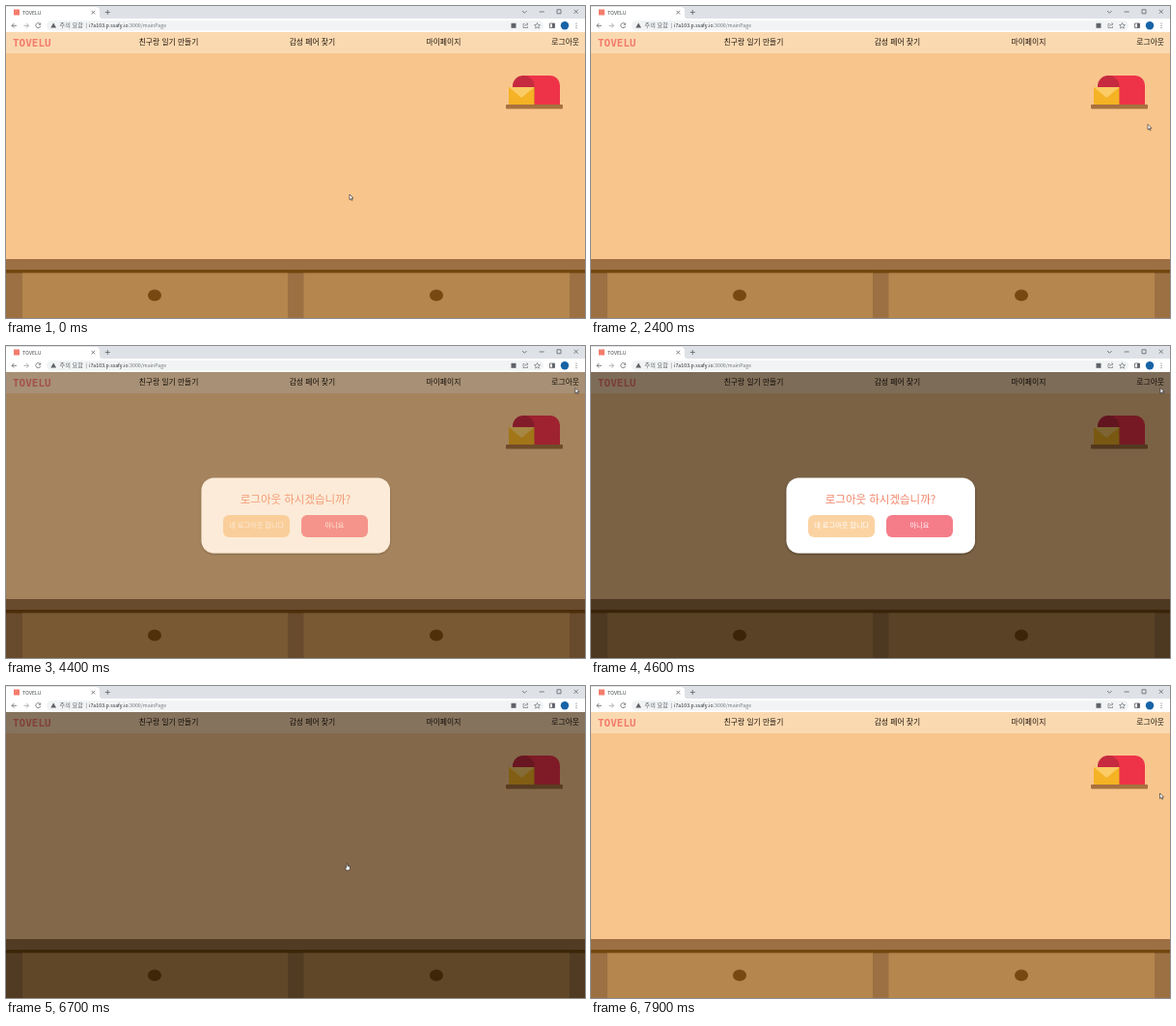
An HTML page for the animation above (8000 ms loop, 600 px wide and 323 px high).

```html
<!DOCTYPE html>
<html lang="ko">
<head>
<meta charset="utf-8">
<style>
html, body { margin: 0; height: 100%; overflow: hidden; }
svg { display: block; width: 100vw; height: 100vh; }
text { font-family: "Noto Sans CJK KR", "Noto Sans CJK", "Noto Sans", sans-serif; white-space: pre; }
.nav { font-size: 7.8px; font-weight: 500; fill: #21160d; }
.icon { fill: none; stroke: #5f6368; stroke-width: .8; }
.mid { text-anchor: middle; font-weight: 500; }
</style>
</head>
<body>
<svg viewBox="0 0 600 323" preserveAspectRatio="none">
  <defs>
    <filter id="shadow" x="-10%" y="-10%" width="120%" height="130%">
      <feDropShadow dx="0" dy="1" stdDeviation="1.2" flood-opacity=".45"/>
    </filter>
  </defs>

  <!-- page -->
  <rect width="600" height="323" fill="#f8c58c"/>
  <rect y="27" width="600" height="22" fill="#fbd9b0"/>
  <text x="7" y="42" style="font:bold 11px 'DejaVu Sans Mono',monospace" fill="#f47c6c">TOVELU</text>
  <g class="nav">
    <text x="137.7" y="40.4">친구랑 일기 만들기</text>
    <text x="293.7" y="40.4">감성 페어 찾기</text>
    <text x="435.5" y="40.4">마이페이지</text>
    <text x="565.3" y="40.4">로그아웃</text>
  </g>

  <!-- mailbox -->
  <path d="M525 102V83a11 11 0 0 1 11-11h12v30z" fill="#c52a3f"/>
  <path d="M536 72h28a10 10 0 0 1 10 10v20h-26.500V83a11 11 0 0 0-11.500-11z" fill="#ee3348"/>
  <rect x="521" y="84" width="26.500" height="18.500" fill="#f4b224"/>
  <path d="M521 84h26.500l-13.200 11z" fill="#fbcb66"/>
  <rect x="518" y="102" width="59" height="4.500" rx="1" fill="#a8713f"/>

  <!-- desk -->
  <rect y="262" width="600" height="61" fill="#9c7043"/>
  <rect y="273" width="600" height="3.500" fill="#744610"/>
  <path d="M17 276.500h275V323H17zM308.500 276.500H584V323H308.500z" fill="#b5864d"/>
  <g fill="#774811">
    <ellipse cx="154" cy="299.500" rx="7" ry="6"/>
    <ellipse cx="446" cy="299.500" rx="7" ry="6"/>
  </g>

  <!-- dialog -->
  <g id="dialog">
    <rect y="27" width="600" height="296" opacity=".5"/>
    <g id="card">
      <rect x="202.500" y="136.500" width="195.500" height="78" rx="13" fill="#fff" filter="url(#shadow)"/>
      <text class="mid" x="300" y="163.300" font-size="11.500" fill="#f0866a">로그아웃 하시겠습니까?</text>
      <rect x="225" y="175" width="69" height="23" rx="6" fill="#fbd3a2"/>
      <rect x="306" y="175" width="69" height="23" rx="6" fill="#f57d8a"/>
      <g fill="#fff" font-size="7.200">
        <text class="mid" x="259.700" y="188.400">네 로그아웃 합니다</text>
        <text class="mid" x="340.400" y="188.400">아니요</text>
      </g>
    </g>
  </g>

  <!-- browser -->
  <rect width="600" height="14" fill="#dee1e6"/>
  <path d="M0 13V1h93q4 0 4 4v5q0 3 3 3z" fill="#fff"/>
  <rect y="13" width="600" height="14" fill="#fff"/>
  <rect x="42" y="15" width="515" height="10.500" rx="5.200" fill="#f1f3f4"/>
  <rect x="8" y="3.500" width="6" height="6" fill="#f47c6c"/>
  <text x="17" y="8.600" font-size="5.300" fill="#45494d">TOVELU</text>
  <g class="icon">
    <path d="M88.500 4.800l3.600 3.600m0-3.600l-3.600 3.600M102.800 6.500h5m-2.500-2.500v5"/>
    <path d="M535 5l2.300 2.300L539.600 5M552.700 6h5M571 3.800h4v4h-4zM588.700 3.800l4 4m0-4l-4 4"/>
    <path d="M11 20.300H6m2.300-2.300L6 20.300l2.300 2.300"/>
    <path d="M18.500 20.300h5m-2.300-2.300l2.300 2.300-2.300 2.300" stroke="#9a9da1"/>
    <path d="M35.300 18.600a2.500 2.500 0 1 0 .4 2.300M35.700 17.500v1.800h-1.800"/>
    <path d="M537.500 18.500H536v4h4.500V21M537.500 21q.5-2.300 3.300-2.300m-1.300-1.400l1.500 1.400-1.500 1.400" stroke-width=".6"/>
    <path d="M550.500 17.400l.9 2 2.100.2-1.600 1.400.5 2.100-1.900-1.100-1.900 1.100.5-2.100-1.600-1.400 2.100-.2z" stroke-width=".6"/>
    <path d="M563.500 18h5v4.600h-5z"/>
  </g>
  <g fill="#5f6368">
    <path d="M49.200 17.600l2.900 5h-5.800zM566 18h2.500v4.600H566z"/>
    <rect x="523.500" y="17.800" width="5" height="5"/>
    <circle cx="591" cy="18" r=".6"/><circle cx="591" cy="20.300" r=".6"/><circle cx="591" cy="22.600" r=".6"/>
  </g>
  <circle cx="579" cy="20.300" r="4.200" fill="#1763a6"/>
  <text x="55.500" y="22.400" font-size="6.200" fill="#5f6368">주의 요함</text>
  <path d="M83.400 17.500v5.800" stroke="#9a9da1" stroke-width=".6"/>
  <text x="86" y="22.300" font-size="5.250" fill="#2c2f33">i7a103.p.ssafy.io<tspan fill="#74787d">:3000/mainPage</tspan></text>

  <!-- pointer -->
  <g id="cursor" stroke="#222" stroke-width=".6" fill="#fff">
    <path id="arrow" d="M0 0v5.600l1.300-1.200.9 2 .9-.4-.9-2H4z"/>
    <path id="hand" d="M-.6 0h1.100v2.200l2.400.7v2.300L2.200 6.800H-.8L-2.300 4l.6-.5 1.100.8z"/>
  </g>
</svg>
<script>
const $ = id => document.getElementById(id);
const clamp = v => Math.max(0, Math.min(1, v));
const ramp = (t, a, b) => clamp((t - a) / (b - a));

// time, x, y of the pointer tip
const path = [
  [0, 356, 195], [1500, 356, 195], [2400, 577, 122.5], [2500, 577, 122],
  [3300, 591, 73], [4000, 590, 43.500], [4900, 590, 43.500], [5700, 409.500, 156],
  [5800, 385, 170], [6200, 353.500, 184], [6700, 353.500, 184],
  [7400, 586, 124], [7900, 589.500, 111], [8000, 589.500, 111]
];

function pointer(t) {
  const i = path.findIndex(p => p[0] > t);
  const [t0, x0, y0] = path[i - 1], [t1, x1, y1] = path[i];
  const u = ramp(t, t0, t1), k = u * u * (3 - 2 * u);
  return [x0 + (x1 - x0) * k, y0 + (y1 - y0) * k];
}

function draw(now) {
  const t = Math.floor(now % 8000 / 100) * 100; // ten pictures a second
  const [x, y] = pointer(t);
  const overButton = t > 5000 && t <= 6700 && x > 306 && x < 375 && y > 175;
  $('cursor').setAttribute('transform', `translate(${x} ${y})`);
  $('arrow').style.display = overButton ? 'none' : '';
  $('hand').style.display = overButton ? '' : 'none';
  $('dialog').style.opacity = ramp(t, 4200, 4500) * (1 - ramp(t, 6680, 7000));
  $('card').style.display = t < 6600 ? '' : 'none';
  requestAnimationFrame(draw);
}
requestAnimationFrame(draw);
</script>
</body>
</html>
```
